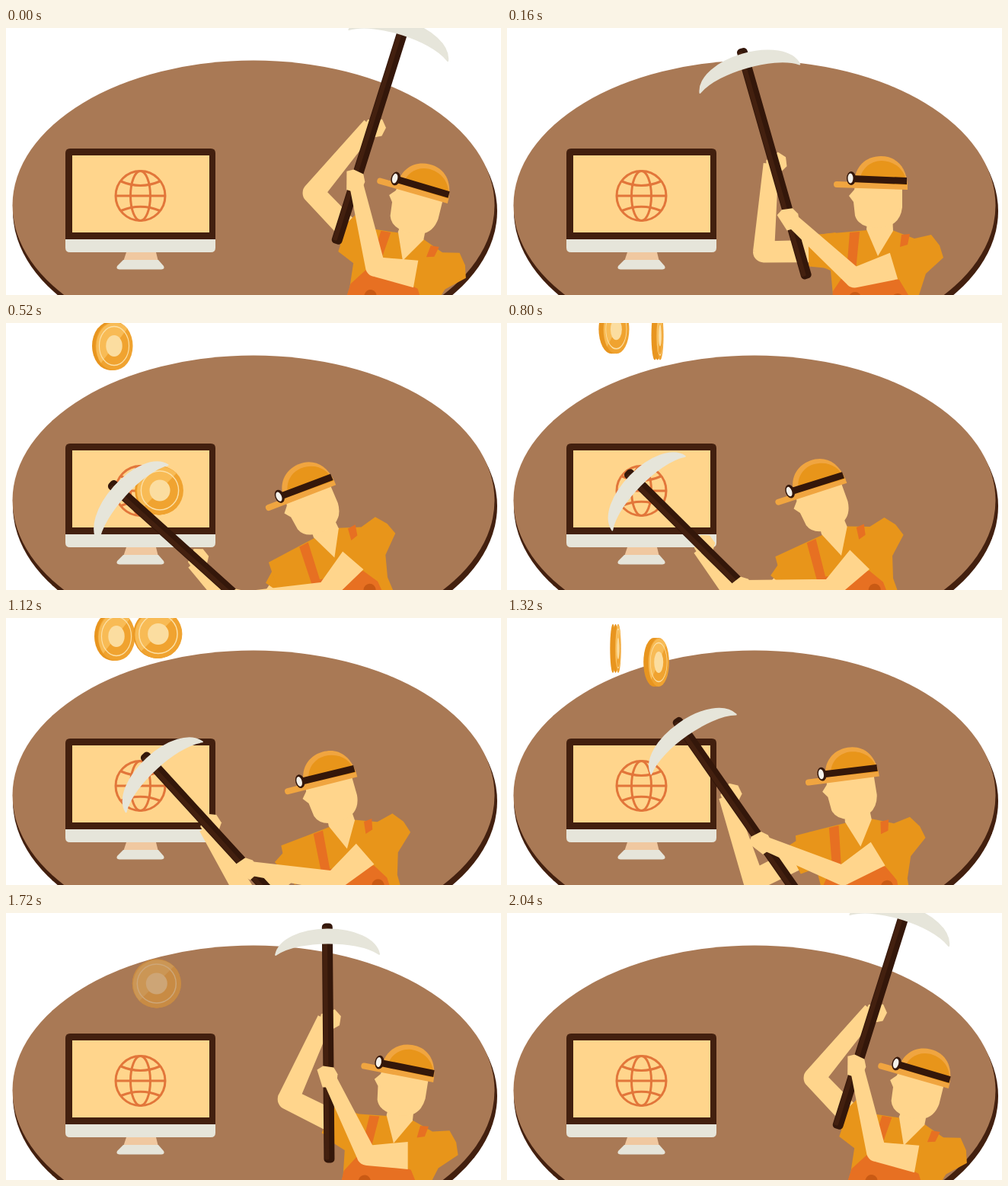
Write an HTML page that moves like this. It is 650 px wide and 350 px high and loops after 2.08 s.

```html
<!DOCTYPE html>
<html lang="en">
<head>
<meta charset="utf-8">
<title>Coin miner</title>
<style>
  html, body { margin: 0; width: 650px; height: 350px; overflow: hidden; background: #fff; }
  svg { display: block; }
  .brown { fill: #a97955; }
  .dark { fill: #43200f; }
  .black { fill: #34170a; }
  .cream { fill: #e6e5da; }
  .skin { fill: #ffd58c; }
  .shirt { fill: #e8951a; }
  .light { fill: #f0a540; }
  .denim { fill: #e77022; }
  .globe { fill: none; stroke: #e2763a; stroke-width: 3; }
</style>
</head>
<body>
<svg width="650" height="350" viewBox="0 0 650 350">
  <defs>
    <circle id="rim" r="32" fill="#e8951f"/>
    <g id="face">
      <circle r="32" fill="#f0a330"/>
      <path d="M-22.6 22.6A32 32 0 0 1 22.6 -22.6Z" fill="#f8bb55"/>
      <circle r="25.5" fill="none" stroke="#fce0a6" stroke-width="1.5"/>
      <circle r="14" fill="#fbdda0"/>
    </g>
  </defs>

  <ellipse class="dark" cx="327" cy="240" rx="318" ry="190"/>
  <ellipse class="brown" cx="325" cy="232.500" rx="316.500" ry="190"/>

  <g id="monitor">
    <path class="dark" d="M78 278V164q0-6 6-6H269q6 0 6 6V278Z"/>
    <path class="skin" d="M87 167H267V268H87Z"/>
    <path class="cream" d="M78 277H275V288q0 6-6 6H84q-6 0-6-6Z"/>
    <path fill="#f0c8a0" d="M158 294H197L200 306H154Z"/>
    <path class="cream" d="M154 304H200L207 312q2 4-3 4.500H149q-5-.5-3-4.500Z"/>
    <g class="globe">
      <circle cx="176.500" cy="220" r="32.500"/>
      <ellipse cx="176.500" cy="220" rx="13" ry="32.500"/>
      <path d="M144 220H209M151 201Q176.500 212 202 201M151 239.500Q176.500 229 202 239.500"/>
    </g>
  </g>

  <g id="coins"></g>

  <path id="backArm" class="skin"/>
  <path id="backFist" class="skin" d="M-14 16L-9 -6L9 -12L17 -3L15 9L2 16Z"/>
  <path id="sleeve" class="shirt"/>

  <g id="body">
    <path class="shirt" d="M405 271L440 268L473 265L487 298L506 265L535 276L557 271L568 285L573 301L550 322L541 350V450H420L428 350L425 318L402 308Z"/>
    <path class="denim" d="M450 268L463 267L458 318L515 330L527 350L530 450H422L428 345L446 318ZM518 271L529 270L526 284L516 287Z"/>
    <g fill="#c95a14"><circle cx="457" cy="354" r="8"/><circle cx="513" cy="356" r="8"/></g>
    <path class="skin" d="M474 245L472 264L487 299L507 266L506 245Z"/>
    <path class="skin" d="M457 207L456 212L449 220L455 228L457 246Q462 262 488 262Q516 261 519 235V207Z"/>
    <path class="light" d="M456 204C456 182 471 168 491 168C511 168 525 182 526 207Z"/>
    <path class="shirt" d="M463 204C463 185 477 174 492 174C512 175 524 188 525 206Z"/>
    <path class="light" d="M433 201L460 202L526 206V212L433 209a4 4 0 0 1 0-8Z"/>
    <path class="black" d="M452 193L525 196V205L452 202Z"/>
    <ellipse class="black" cx="452" cy="197" rx="6" ry="9"/>
    <ellipse fill="#f4f1ea" cx="451" cy="197" rx="3.500" ry="6.500"/>
  </g>

  <g id="pick">
    <rect class="black" x="-7" width="14" height="314" rx="5"/>
    <rect class="dark" x="-6" y="4" width="6" height="306" rx="2"/>
    <path class="cream" stroke="#e6e5da" stroke-width="2" stroke-linejoin="round"
      d="M-68 41C-64 21-35 8 0 8S64 21 68 41C52 30 24 26 0 26S-52 30-68 41Z"/>
  </g>

  <path id="frontArm" class="skin"/>
  <path id="frontFist" class="skin" d="M-15 -9L-7 -14L7 -12L12 -3L10 14L-8 14Z"/>
</svg>

<script>
const LOOP = 2080, STEP = 40, RAD = Math.PI / 180;
const $ = id => document.getElementById(id);
const set = (node, name, value) => node.setAttribute(name, value);

// time, lean of the body, tilt of the pick, front grip along the shaft
const swing = [
  [0, 14, 17.5, 228],
  [160, 0, -16, 232],
  [280, -31, -62, 235],
  [520, -23, -48, 228],
  [1120, -16, -42.5, 203],
  [1520, 0, -22, 195],
  [1720, 9, -.5, 201],
  [2040, 14, 17.5, 228],
];

// keys: time, height, spin
const coins = [
  { x: 142, drift: 5, end: 1680, keys: [[300, 222, 0], [520, 30, 40], [760, 8, 110], [1120, 24, 220], [1520, 57, 300], [1680, 66, 325]] },
  { x: 202, drift: -3.5, end: 1860, keys: [[460, 223, 0], [520, 219.5, 15], [840, 8, 110], [1120, 21, 190], [1520, 90, 300], [1720, 92.5, 360], [1860, 94, 400]] },
];

// Monotone cubic curve through the keys
function sample(keys, t) {
  const last = keys.length - 1;
  t = Math.min(Math.max(t, keys[0][0]), keys[last][0]);
  const i = Math.min(keys.findLastIndex(k => k[0] <= t), last - 1);
  const span = keys[i + 1][0] - keys[i][0], u = (t - keys[i][0]) / span, v = 1 - u;
  const rate = (j, n) => (keys[j + 1][n] - keys[j][n]) / (keys[j + 1][0] - keys[j][0]);
  const slope = (j, n) => {
    if (j === 0 || j === last) return 0;
    const a = rate(j - 1, n), b = rate(j, n);
    return a * b > 0 ? 2 * a * b / (a + b) : 0;
  };
  return keys[i].map((a, n) => n && a * (1 + 2 * u) * v * v + keys[i + 1][n] * u * u * (3 - 2 * u)
    + span * (slope(i, n) * u * v * v - slope(i + 1, n) * u * u * v)).slice(1);
}

const polar = ([x, y], deg, r) => [x + r * Math.cos(deg * RAD), y + r * Math.sin(deg * RAD)];
const heading = (a, b) => Math.atan2(b[1] - a[1], b[0] - a[0]) / RAD;

function taper(a, b, ra, rb) {
  const n = heading(a, b) + 90;
  return 'M' + [polar(a, n, -ra), polar(b, n, -rb), polar(b, n, rb), polar(a, n, ra)].join('L') + 'Z';
}

const disc = ([x, y], r) => `M${x - r} ${y}a${r} ${r} 0 1 1 ${2 * r} 0a${r} ${r} 0 1 1 ${-2 * r} 0Z`;

// Elbow of a two-bone arm
function bend(shoulder, hand, upper, fore) {
  const d = Math.hypot(hand[0] - shoulder[0], hand[1] - shoulder[1]);
  const cos = (upper * upper + d * d - fore * fore) / (2 * upper * d);
  return polar(shoulder, heading(shoulder, hand) - Math.acos(Math.min(1, cos)) / RAD, upper);
}

const arm = (hand, elbow, shoulder, wrist, joint, top) =>
  taper(hand, elbow, wrist, joint) + disc(elbow, joint) + taper(elbow, shoulder, joint, top);

function drawMiner(t) {
  const [lean, tilt, grip] = sample(swing, t);
  const hip = [480, 440];
  const onBody = p => polar(hip, heading(hip, p) + lean, Math.hypot(p[0] - hip[0], p[1] - hip[1]));

  // The front arm swings with the lean; the pick hangs from its hand
  const shoulder = onBody([508, 312]);
  const lift = 24.5 + 2.15 * lean + .012 * lean * lean;
  const hand = polar(shoulder, 180 + lift, 150 - .35 * lean);
  const top = polar(hand, tilt - 90, grip);
  const backGrip = grip - 76;
  const backHand = polar(polar(top, tilt + 90, backGrip), tilt, -4);
  const backShoulder = onBody([432, 292]);
  const backElbow = bend(backShoulder, backHand, 95, 116);
  const cuff = polar(backShoulder, heading(backShoulder, backElbow), 36);

  const pick = `translate(${top}) rotate(${tilt})`;
  set($('body'), 'transform', `rotate(${lean} ${hip})`);
  set($('pick'), 'transform', pick);
  set($('frontFist'), 'transform', `${pick} translate(0 ${grip})`);
  set($('backFist'), 'transform', `${pick} translate(0 ${backGrip})`);
  set($('backArm'), 'd', arm(backHand, backElbow, backShoulder, 10, 14, 15));
  set($('sleeve'), 'd', taper(backShoulder, cuff, 24, 20));
  set($('frontArm'), 'd', arm(hand, bend(shoulder, hand, 54, 115), shoulder, 9, 13, 18));
}

function drawCoin({ node, x, drift, end, keys }, t) {
  const [y, spin] = sample(keys, t);
  const width = Math.max(.03, Math.abs(Math.cos(spin * RAD)));
  const depth = 7 * Math.abs(Math.sin(spin * RAD));
  set(node, 'transform', `translate(${x + drift * (t - 520) / 1000} ${y})`);
  set(node, 'opacity', t < keys[0][0] ? 0 : Math.min(1, Math.max(0, (end - t) / 320)));
  [...node.children].forEach((part, i) =>
    set(part, 'transform', `translate(${depth * (i / 2 - 1)} 0) scale(${width} 1)`));
}

for (const coin of coins) {
  coin.node = $('coins').appendChild(document.createElementNS('http://www.w3.org/2000/svg', 'g'));
  coin.node.innerHTML = '<use href="#rim"/><use href="#rim"/><use href="#face"/>';
}

const start = performance.now();
function draw() {
  const t = Math.floor((performance.now() - start) % LOOP / STEP) * STEP;
  drawMiner(t);
  coins.forEach(coin => drawCoin(coin, t));
  requestAnimationFrame(draw);
}
draw();
</script>
</body>
</html>
```
